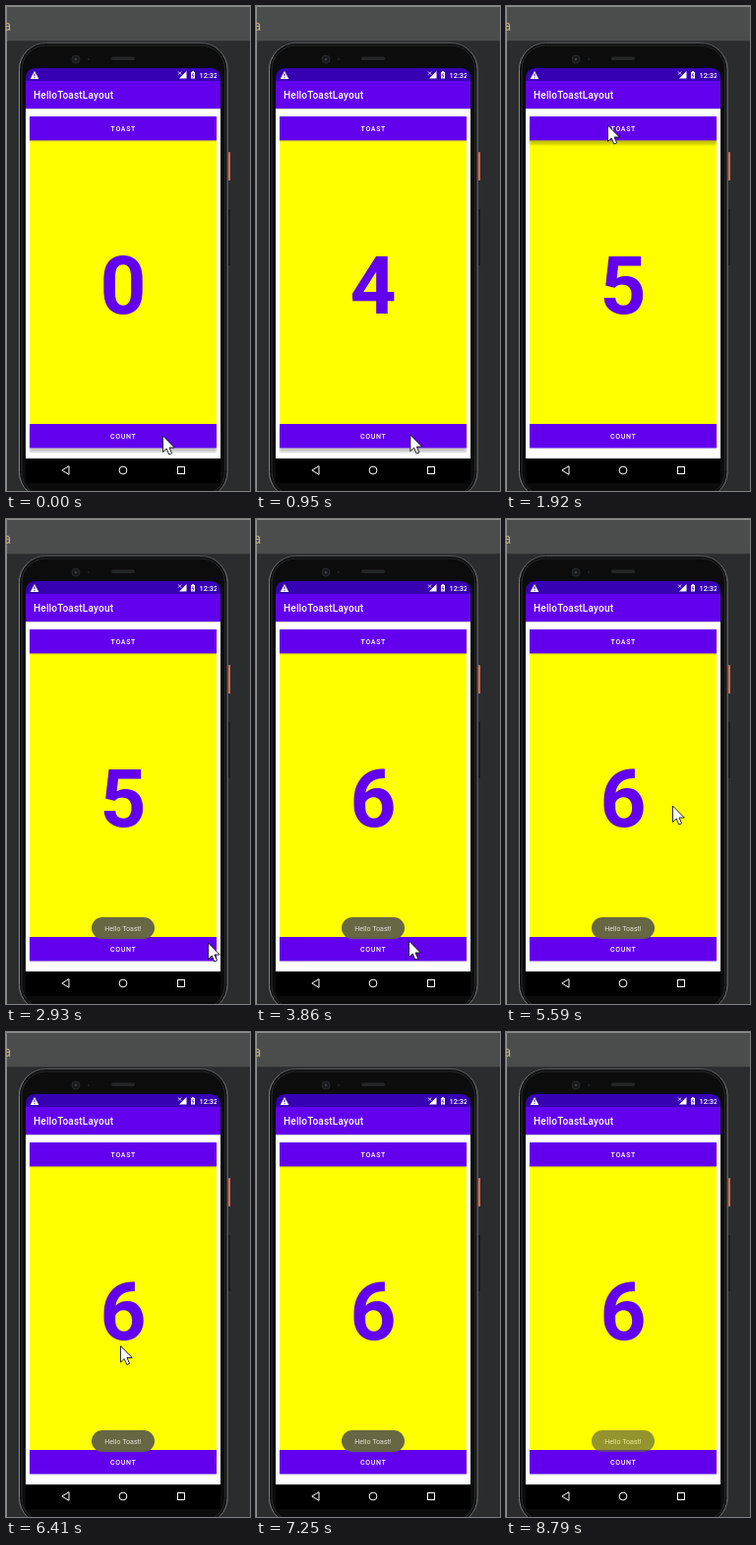
An HTML page that plays this animation: 248 px wide and 492 px high, repeating every 8890 ms.

```html
<!DOCTYPE html>
<html lang="en">
<head>
<meta charset="utf-8">
<title>Counter and toast demo</title>
<style>
  html, body { margin: 0; width: 100%; height: 100%; overflow: hidden; background: #2b2c2e; }
  svg { display: block; width: 248px; height: 492px; }
  text { font-family: Roboto, sans-serif; fill: #fff; }
  .label { font-size: 7.06px; font-weight: 500; letter-spacing: .09em; text-anchor: middle; }
  .outline { fill: none; stroke: #fff; stroke-width: 1; }
</style>
</head>
<body>
<svg viewBox="0 0 248 492">
  <defs>
    <linearGradient id="edge" x2="1" y2="0">
      <stop offset="0" stop-color="#85878a"/>
      <stop offset=".08" stop-color="#56585a"/>
      <stop offset=".92" stop-color="#56585a"/>
      <stop offset="1" stop-color="#77797c"/>
    </linearGradient>
    <filter id="soft" x="-10%" y="-50%" width="120%" height="200%">
      <feGaussianBlur stdDeviation=".8"/>
    </filter>
    <clipPath id="status"><rect x="20" y="63" width="194" height="10.5"/></clipPath>
  </defs>

  <!-- Desktop -->
  <rect width="248" height="492" fill="#2b2c2e"/>
  <rect width="248" height="35.3" fill="#4b4d4d"/>
  <path d="M.5 492V.5H248" fill="none" stroke="#8c8e8e"/>
  <text x="-2.5" y="24.5" font-size="14" style="fill:#c4ad82">a</text>

  <!-- Phone body -->
  <rect x="226" y="148" width="2" height="29" rx=".6" fill="#d9694f"/>
  <rect x="226" y="206" width="2" height="57" rx=".6" fill="#1a1b1c"/>
  <rect x="13.5" y="37.5" width="211.5" height="462" rx="27" fill="#0c0c0c" stroke="url(#edge)"/>
  <rect x="16" y="40" width="206.5" height="457" rx="24.5" fill="none" stroke="#2a2b2c"/>
  <circle cx="71" cy="54" r="4" fill="#17181a" stroke="#292a2c"/>
  <circle cx="71" cy="54" r="1.3" fill="#3b4048"/>
  <circle cx="84" cy="54" r="1.2" fill="#1e1f21"/>
  <rect x="107" y="51.5" width="24" height="3.5" rx="1.7" fill="#252627"/>

  <!-- Screen -->
  <path d="M20 76V74Q20 63 31 63H207Q218 63 218 74V76Z" fill="#3700b3"/>
  <rect x="20" y="76" width="198" height="28" fill="#6200ee"/>
  <rect x="20" y="104" width="198" height="355" fill="#fff"/>
  <rect x="20" y="104" width="198" height="1" fill="#ccc"/>
  <rect x="20" y="459" width="198" height="25" fill="#000"/>
  <rect x="24" y="136" width="190" height="288" fill="#ff0"/>
  <path d="M29 66L33.3 74H24.7Z" fill="#fff"/>
  <path d="M29 68.5V71.3M29 72.2V73.2" stroke="#3700b3"/>
  <path d="M183.5 66V73.5H176Z" fill="#fff"/>
  <path d="M175 66.5L178.2 69.7M178.2 66.5L175 69.7" class="outline" style="stroke-width:.8"/>
  <path d="M188 67H189.2V66H190.8V67H192V73.5H188Z" fill="#fff"/>
  <path d="M190.4 68L189.2 70.6H190.8L189.7 72.6" fill="none" stroke="#3700b3" stroke-width=".7"/>
  <text x="196.5" y="73" font-size="7.4" font-weight="500" clip-path="url(#status)">12:32</text>
  <text x="28" y="94" font-size="10.15" font-weight="500" letter-spacing=".13">HelloToastLayout</text>

  <text id="digit" x="119" y="312.4" font-size="82" font-weight="700" text-anchor="middle" style="fill:#6200ee">0</text>

  <g id="buttons"></g>

  <g id="toast">
    <rect x="87" y="404" width="64" height="22" rx="11" fill="#636347" fill-opacity=".97"/>
    <text x="119" y="417.7" font-size="7.06" text-anchor="middle" style="fill:#e2e2da">Hello Toast!</text>
  </g>

  <!-- Navigation -->
  <path class="outline" d="M64 466.7V475.3L56.8 471Z"/>
  <circle class="outline" cx="119" cy="471" r="3.9"/>
  <rect class="outline" x="174.5" y="467.5" width="7" height="7"/>

  <path id="cursor" d="M-.5 0V16.5L3.2 13L5.8 19L8.6 17.8L6 12H11.3Z" fill="#fff" stroke="#111" stroke-width=".9"/>
</svg>
<script>
const LOOP = 8890, TICKS = 65, TICK = LOOP / TICKS;
const CAPTURE_LAG = 60;
const find = id => document.getElementById(id);
const clamp = v => Math.min(1, Math.max(0, v));
const between = (k, from, to) => k >= from && k < to;

function addButton(label, top) {
  find('buttons').insertAdjacentHTML('beforeend', `
    <g>
      <rect x="24" width="190" height="24" fill="#000" filter="url(#soft)"/>
      <rect x="24" y="${top}" width="190" height="24.4" fill="#6200ee"/>
      <text class="label" x="119.3" y="${top + 14.8}">${label}</text>
    </g>`);
  const [shadow] = find('buttons').lastElementChild.children;
  return pressed => {
    shadow.setAttribute('y', top + (pressed ? 4.5 : 1));
    shadow.setAttribute('opacity', pressed ? .22 : .15);
  };
}
const pressToast = addButton('TOAST', 112);
const pressCount = addButton('COUNT', 424);

const clicks = [1, 4, 5, 7, 9, 27];
const stops = [
  [0, 160, 436], [9, 157, 435], [11, 104, 121], [19, 104, 121], [21, 206, 430],
  [23, 184, 446], [28, 156, 428], [32, 74, 123], [34, 74, 123], [38, 207, 250],
  [41, 170, 291], [44, 215, 56], [46, 84, 240], [48, 150, 397], [50, 218, 348], [53, 100, 500]
];

function cursorAt(k) {
  const i = stops.findIndex(([end]) => end > k);
  if (i < 0) return stops.at(-1).slice(1);
  const [start, ...a] = stops[i - 1], [end, ...b] = stops[i];
  const u = (k - start) / (end - start), ease = u * u * (3 - 2 * u);
  return a.map((v, axis) => v + (b[axis] - v) * ease);
}

const toastFade = (k, from, to) => Math.min(clamp((k - from) / 2), clamp(1 - (k - to) / 4));

function draw(time) {
  const k = Math.floor((time % LOOP + CAPTURE_LAG) / TICK);
  find('digit').textContent = clicks.filter(click => click <= k).length;
  find('toast').setAttribute('opacity', toastFade(k, 14, 28) + toastFade(k, 33, 62.8));
  find('cursor').setAttribute('transform', `translate(${cursorAt(k)})`);
  pressCount(between(k, 0, 10) || between(k, 26, 28));
  pressToast(between(k, 14, 16));
}

const begin = performance.now();
function tick() {
  draw(performance.now() - begin);
  requestAnimationFrame(tick);
}
tick();
</script>
</body>
</html>
```
